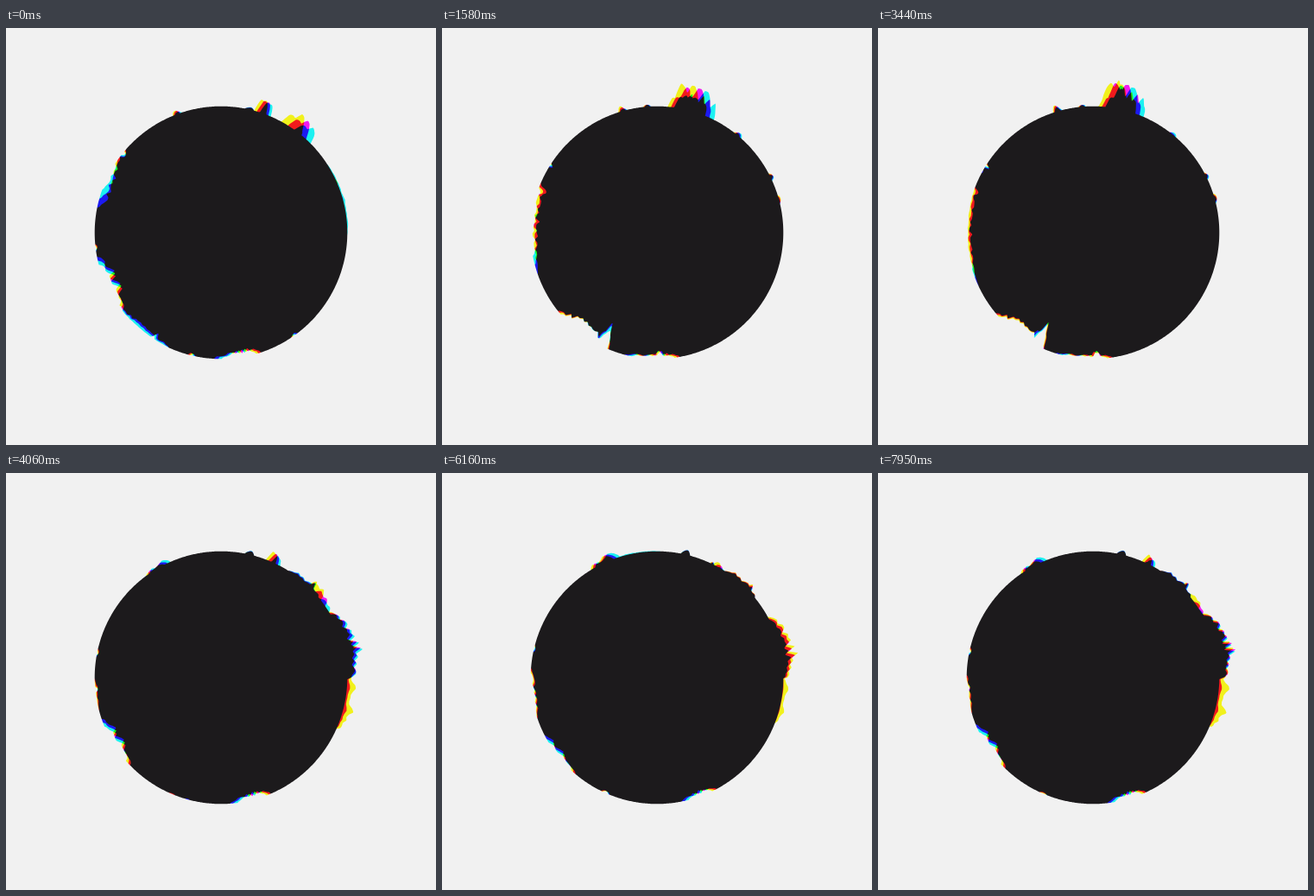
Recreate the animation shown at these times as an HTML page with a canvas. Size 498 by 483 pixels, loop 8000 ms.

```html
<!DOCTYPE html>
<html lang="en">
<head>
<meta charset="utf-8">
<title>Dark disc with burning rim</title>
<style>
  html, body { margin: 0; width: 100%; height: 100%; overflow: hidden; background: #f1f1f1; }
  canvas { display: block; }
</style>
</head>
<body>
<canvas id="stage" width="498" height="483"></canvas>
<script>
const ctx = document.getElementById('stage').getContext('2d');
const W = 498, H = 483, CX = 249, CY = 237, R = 146.3;
const LOOP = 8000, STEP = 68.4, CYCLE = 28;

// Light added per channel outside the disc. Red runs ahead of green and
// blue behind it, which splits every moving flare into coloured fringes.
const LIGHT = ['#d50000', '#00d700', '#0000d5'];
const LAG = .7;

const mod = (a, n) => ((a % n) + n) % n;
const mix = (a, b, k) => a + (b - a) * k;

function hash(n, seed) {
  const s = Math.sin(n * 127.1 + seed * 311.7) * 43758.5453;
  return s - Math.floor(s);
}

function noise(x, seed) {
  const i = Math.floor(x);
  return mix(hash(i, seed), hash(i + 1, seed), x - i);
}

// A flare slides along the rim (degrees clockwise from the top) while it
// swells and fades. Negative heights bite into the disc.
// pace bends the path, attack bends the swelling, tint weighs the channels.
const flare = (born, life, angle, width, height, options) =>
  ({ born, life, angle, width, height, pace: 1, attack: 1, tint: [1, 1, 1], ...options });

const crest = flare(6, 27, [-12, 62], [28, 6], 24, { pace: 2, attack: 1.2 });
const follower = flare(17, 18, [-5, 31], [9, 3], 17, { pace: .8 });
const gust = flare(28.5, 7.5, [74, 77], [34, 26], 20);
const gustTail = flare(28.3, 6, [102, 100], [27, 20], 13, { tint: [0, .3, 1] });
const shoulder = flare(29, 8, [41, 42], [18, 18], 6);
const spike = flare(24, 28, [13, 13], [4, 4], 7);
const upperLeft = flare(1, 10, [326, 345], [9, 14], 7);

const leftEdge = flare(20.5, 9, [262, 302], [44, 14], -13, { attack: 1.3 });
const ember = flare(17, 12, [212, 222], [20, 34], -14);
const hollow = flare(25, 13, [252, 222], [26, 16], -15, { attack: .4 });
const lick = flare(18.5, 7, [209, 204], [7, 5], -22);
const bottomRim = flare(18, 21, [192, 150], [26, 10], -9);
const leftDust = flare(2, 14, [262, 264], [10, 48], -6);

// Short flickers: inward on the lower left, outward elsewhere.
const sparks = Array.from({ length: 28 }, (_, i) => {
  const at = 360 * hash(i, 1), width = mix(1.2, 3.5, hash(i, 2));
  const side = at > 130 && at < 310 ? -1 : 1;
  return flare(CYCLE * hash(i, 3), mix(4, 9, hash(i, 4)),
               [at, at + 4], [width, width], side * mix(2, 7, hash(i, 5)));
});

const flares = [
  crest, follower, gust, gustTail, shoulder, spike, upperLeft,
  leftEdge, ember, hollow, lick, bottomRim, leftDust, ...sparks
];

// Shape of a flare in one channel, or null while it is out.
function poseAt(f, phase, channel, seed) {
  const q = mod(phase - f.born, CYCLE) / f.life;
  if (q >= 1) return null;
  const width = mix(...f.width, q);
  return {
    width, seed,
    from: mix(...f.angle, q ** f.pace) - width / 2,
    height: f.height * f.tint[channel] * Math.sin(Math.PI * q ** f.attack)
  };
}

function heightAt(p, deg) {
  const d = mod(deg - p.from, 360);
  if (d > p.width) return 0;
  const shape = Math.sqrt(Math.sin(Math.PI * d / p.width));
  const jag = p.width < 4 ? 1 : .4 + .8 * noise(d * .7, p.seed);
  return p.height * shape * jag;
}

function channelPath(phase, channel) {
  const time = phase + (1 - channel) * LAG;
  const live = flares.map((f, i) => poseAt(f, time, channel, i + 7)).filter(Boolean);
  const path = new Path2D();
  path.rect(0, 0, W, H);
  for (let n = 0; n < 900; n++) {
    const deg = n * .4, a = deg * Math.PI / 180;
    const r = live.reduce((sum, p) => sum + heightAt(p, deg), R);
    const x = CX + r * Math.sin(a), y = CY - r * Math.cos(a);
    if (n) path.lineTo(x, y); else path.moveTo(x, y);
  }
  path.closePath();
  return path;
}

function draw(phase) {
  ctx.globalCompositeOperation = 'source-over';
  ctx.fillStyle = '#1c1a1c';
  ctx.fillRect(0, 0, W, H);
  ctx.globalCompositeOperation = 'lighter';
  LIGHT.forEach((colour, channel) => {
    ctx.fillStyle = colour;
    ctx.fill(channelPath(phase, channel), 'evenodd');
  });
}

const start = performance.now();
let shown = -1;

function tick() {
  const t = (performance.now() - start) % LOOP;
  const phase = Math.floor(t / STEP) % CYCLE;
  if (phase !== shown) draw(shown = phase);
  requestAnimationFrame(tick);
}
tick();
</script>
</body>
</html>
```
